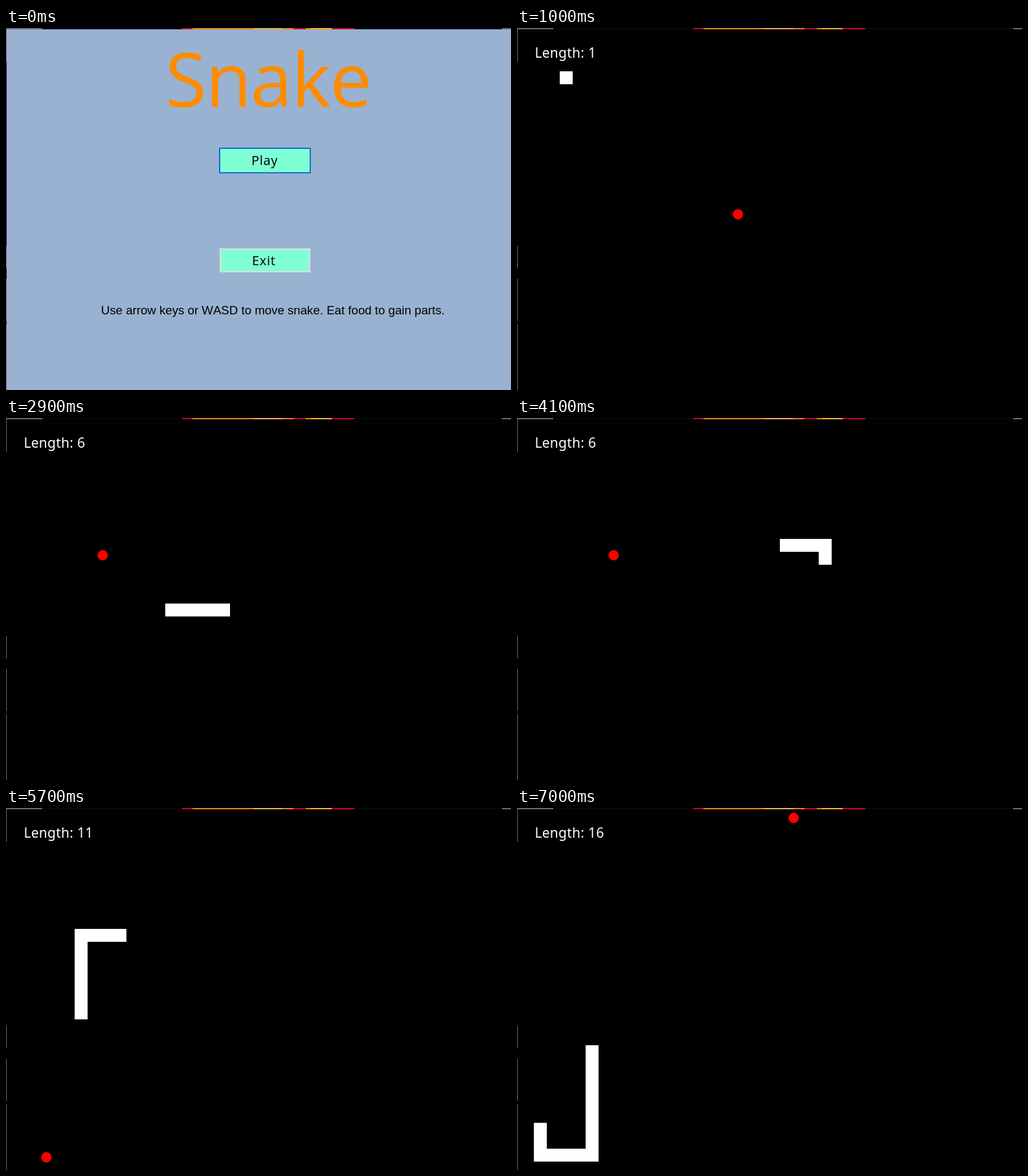
Write an HTML page with a canvas that moves like this. It is 780 by 560 pixels and loops after 7.1 s.

```html
<!DOCTYPE html>
<html lang="en">
<head>
<meta charset="utf-8">
<title>Snake</title>
<style>
  html, body { margin: 0; height: 100%; overflow: hidden; background: #000; }
  canvas { display: block; }
</style>
</head>
<body>
<canvas id="stage" width="780" height="560"></canvas>
<script>
const g = document.getElementById("stage").getContext("2d");
const LOOP = 7100, FRAME = 100, GAME_START = 1000;
const TICK = 78.125, CELL = 20;
const SANS = '"Open Sans", "Noto Sans", sans-serif';

// Grid corners the head passes through
const turns = [[3, 3], [3, 14], [23, 14], [23, 9], [5, 9], [5, 26], [1, 26], [1, 24]];
const trail = [turns[0]];
for (const [x, y] of turns.slice(1)) {
  let [cx, cy] = trail[trail.length - 1];
  while (cx !== x || cy !== y) {
    cx += Math.sign(x - cx);
    cy += Math.sign(y - cy);
    trail.push([cx, cy]);
  }
}

const foods = [[341, 288], [149, 212], [62, 540], [427, 15]];
const eatenAt = [24, 52, 73]; // steps at which the head reaches each food

function rect(color, x, y, w, h) {
  g.fillStyle = color;
  g.fillRect(x, y, w, h);
}

function text(str, x, y, size, family, color, spacing = 0) {
  g.font = `${size}px ${family}`;
  g.letterSpacing = spacing + "px";
  g.fontKerning = "none";
  g.fillStyle = color;
  g.fillText(str, x, y);
}

// Slivers of the desktop along the top and left edges
function edges() {
  const navy = "#05051a", gray = "#68686c", red = "#c4002a", orange = "#e67e1a";
  const top = [[0, gray], [56, navy], [272, red], [288, orange], [382, "#eda848"],
    [427, orange], [444, red], [463, orange], [471, "#f2b022"], [503, red],
    [538, navy], [766, gray], [780]];
  const left = [[2, gray], [52, navy], [337, gray], [372, "#000"], [388, gray],
    [453, "#000"], [458, gray], [560]];
  for (let i = 0; i < top.length - 1; i++)
    rect(top[i][1], top[i][0], 0, top[i + 1][0] - top[i][0], 2);
  for (let i = 0; i < left.length - 1; i++)
    rect(left[i][1], 0, left[i][0], 1, left[i + 1][0] - left[i][0]);
}

function button(label, x, y, w, h, border, tx, ty) {
  rect(border, x, y, w, h);
  rect("#7fffd4", x + 2, y + 2, w - 4, h - 4);
  text(label, tx, ty, 20, SANS, "#000", 0.7);
}

function menu() {
  rect("#99b2d1", 0, 0, 780, 560);
  text("Snake", 246, 122, 116, SANS, "#ff8c00", -1.5);
  button("Play", 329, 185, 142, 40, "#1b6fcb", 379, 212);
  button("Exit", 330, 341, 140, 37, "#dcdfe0", 380, 367);
  text("Use arrow keys or WASD to move snake. Eat food to gain parts.",
    146.8, 443, 18.67, '"Liberation Sans", Arial, sans-serif', "#000");
}

function game(t) {
  const step = Math.min(trail.length - 1, Math.floor((t - GAME_START) / TICK + 0.25));
  const eaten = eatenAt.filter(s => step >= s).length;
  const length = 1 + 5 * eaten;
  const shown = Math.max(1, length - 1);

  rect("#000", 0, 0, 780, 560);
  edges();
  text("Length: " + length, 27.5, 46, 21, '"Noto Sans", sans-serif', "#fff", 0.25);

  const [fx, fy] = foods[eaten];
  g.fillStyle = "#f00";
  g.beginPath();
  g.arc(fx + 0.3, fy + 0.3, 8, 0, 2 * Math.PI);
  g.fill();

  for (const [x, y] of trail.slice(Math.max(0, step + 1 - shown), step + 1))
    rect("#fff", 6 + x * CELL, 7 + y * CELL, CELL, CELL);
}

function draw() {
  const now = performance.now() % LOOP;
  const t = Math.floor(now / FRAME) * FRAME;
  if (t < GAME_START) {
    menu();
    edges();
  } else {
    game(t);
  }
  requestAnimationFrame(draw);
}
draw();
</script>
</body>
</html>
```
